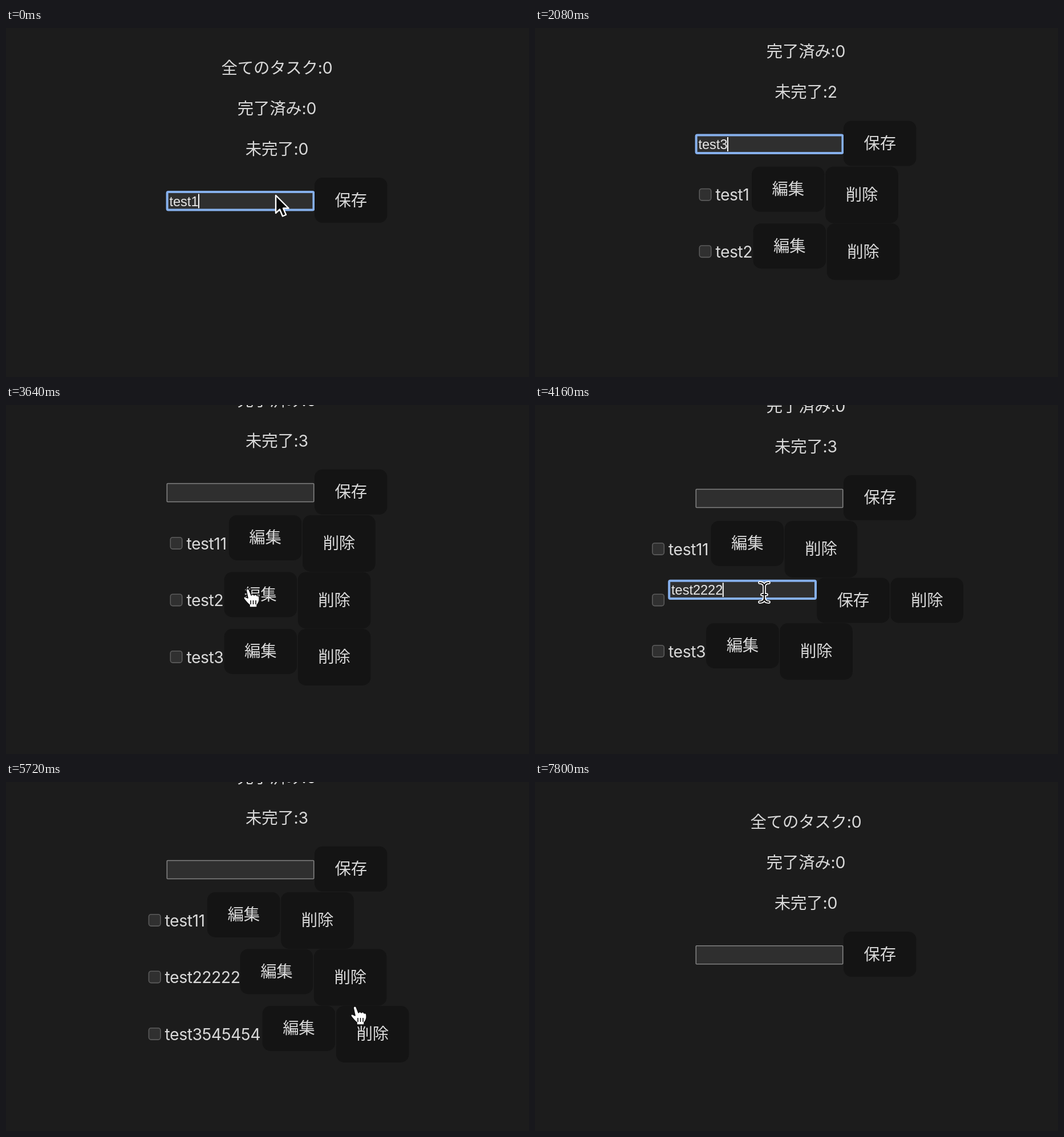
An HTML page for the animation above (8000 ms loop, 917x611 px).

```html
<!DOCTYPE html>
<html lang="ja">
<head>
<meta charset="utf-8">
<title>タスク</title>
<style>
html, body { margin: 0; width: 100%; height: 100%; overflow: hidden; background: #1c1c1c; }
svg { display: block; width: 917px; height: 611px; filter: blur(.5px); }
text {
  fill: #d9d9d9;
  font: 28.4px Inter, "Noto Sans CJK JP", "Noto Sans CJK", sans-serif;
  font-feature-settings: "calt" 0;
  white-space: pre;
}
.mid { text-anchor: middle; letter-spacing: -.2px; }
.task { letter-spacing: -.5px; }
.typed { font: 23.5px "Liberation Sans", Arial, sans-serif; fill: #e6e6e6; }
.button { fill: #141414; }
.field { fill: #2f2f2f; stroke: #828282; stroke-width: 1.6; }
.box { fill: #303030; stroke: #5c5c5c; stroke-width: 1.6; }
.ring { stroke: #86b0ec; stroke-width: 4; }
.button.ring { fill: #121212; }
</style>
</head>
<body>
<svg id="stage" viewBox="0 0 917 611"></svg>
<script>
const LOOP = 8000, STEP = 520;
const CENTER = 475, FORM_W = 387, FIELD_W = 259, BUTTON_W = 127.5, BUTTON_H = 79, GAP = 1.8;
const ROW_H = 99.5, EDIT_H = 79.5, TEXT_X = 35;

// Label widths that the buttons follow
const WIDTHS = { test1: 63.5, test2: 66, test3: 66, test11: 74.3, test22222: 132, test3545454: 171 };

const first = ['test1', 'test2', 'test3'];
const second = ['test11', 'test2', 'test3'];
const third = ['test11', 'test22222', 'test3'];

// value: new task field (missing = unfocused); edit: row being edited; focus: focused part of a row
const steps = [
  { tasks: [], value: 'test1', cursor: ['arrow', 472, 292] },
  { tasks: ['test1'], value: '' },
  { tasks: ['test1'], value: 'test2' },
  { tasks: ['test1', 'test2'], value: '' },
  { tasks: ['test1', 'test2'], value: 'test3' },
  { tasks: first, edit: 0, draft: 'test1', focus: [0, 'save'], cursor: ['arrow', 467, 242] },
  { tasks: first, edit: 0, draft: 'test11', focus: [0, 'field'], cursor: ['beam', 440, 227] },
  { tasks: second, cursor: ['hand', 424, 322] },
  { tasks: second, edit: 1, draft: 'test2222', focus: [1, 'field'], cursor: ['beam', 402, 328] },
  { tasks: third, cursor: ['hand', 440, 426] },
  { tasks: third, edit: 2, draft: 'test3', focus: [2, 'field'], cursor: ['beam', 427, 425.5] },
  { tasks: ['test11', 'test22222', 'test3545454'], cursor: ['hand', 612, 393] },
  { tasks: ['test11', 'test3545454'], focus: [1, 'delete'], cursor: ['hand', 612, 393] },
  { tasks: [], cursor: ['arrow', 572, 345] },
  { tasks: [], cursor: ['arrow', 597, 384] },
  { tasks: [] }
];

const text = (x, y, str, cls) => `<text x="${x}" y="${y}" class="${cls}">${str}</text>`;

const rect = (x, y, w, h, r, cls, inset) =>
  `<rect x="${x + inset}" y="${y + inset}" width="${w - 2 * inset}" height="${h - 2 * inset}" rx="${r}" class="${cls}"/>`;

function button(x, y, label, h = BUTTON_H, focused = false) {
  return rect(x, y, BUTTON_W, h, focused ? 12 : 14, 'button' + (focused ? ' ring' : ''), focused ? 2 : 0)
    + text(x + BUTTON_W / 2, y + h / 2 + 10, label, 'mid');
}

function field(x, y, value, focused) {
  const caret = x + 5.5 + typedWidth(value);
  return rect(x, y, FIELD_W, 33.5, focused ? 2 : 1, 'field' + (focused ? ' ring' : ''), focused ? 1.1 : .8)
    + text(x + 5, y + 25.5, value, 'typed')
    + (focused ? `<path d="M${caret} ${y + 4.5}v25" stroke="#fff" stroke-width="2"/>` : '');
}

const pen = document.createElement('canvas').getContext('2d');
function typedWidth(value) {
  pen.font = '23.5px "Liberation Sans", Arial, sans-serif';
  return pen.measureText(value).width;
}

const cursors = {
  arrow: `<path d="M1 1V32L8 25.5L13 37.5L19 35L14 23.5H23.5Z" fill="#080808" stroke="#fff" stroke-width="2.4" stroke-linejoin="round"/>`,
  beam: ['#fff" stroke-width="5.6', '#0c0c0c" stroke-width="2.2'].map(s =>
    `<path d="M-8 -17Q-1 -17 0 -11Q1 -17 8 -17M0 -11V11M-8 17Q-1 17 0 11Q1 17 8 17M-4 4H4" fill="none" stroke="${s}" stroke-linecap="round"/>`).join(''),
  hand: `<path d="M-3 2Q-1 -2 2 1L6 11Q9 8 11 11Q14 8 16 12Q20 11 20 15Q21 23 16 28V32H3V28Q-1 25 -7 17Q-8 13 -4 14L0 16Z" fill="#fff" stroke="#111" stroke-width="1.6" stroke-linejoin="round"/>
    <path d="M5 20V27M9.5 20V27M14 20V27" stroke="#111" stroke-width="1.6"/>`
};

function row(task, i, left, y, s) {
  const editing = s.edit === i;
  const h = editing ? EDIT_H : ROW_H;
  const focus = s.focus && s.focus[0] === i ? s.focus[1] : '';
  const x = left + TEXT_X;
  const box = rect(left + 6, y + h / 2 - 11.8, 22, 22, 4, 'box', .8);
  if (editing) {
    const next = x + FIELD_W + 1;
    return box + field(x, y + 4.2, s.draft, focus === 'field')
      + button(next, y, '保存', BUTTON_H, focus === 'save')
      + button(next + BUTTON_W + GAP, y, '削除');
  }
  const next = x + WIDTHS[task];
  return box + text(x, y + h / 2 + 10, task, 'task')
    + button(next, y, '編集')
    + button(next + BUTTON_W + GAP, y, '削除', 99, focus === 'delete');
}

const rowWidth = (task, editing) =>
  TEXT_X + (editing ? FIELD_W + 1 : WIDTHS[task]) + 2 * BUTTON_W + GAP;

function scene(s) {
  const n = s.tasks.length;
  const heights = s.tasks.map((_, i) => s.edit === i ? EDIT_H : ROW_H);
  const shift = -heights.reduce((a, b) => a + b, 0) / 2;
  const width = Math.max(FORM_W, ...s.tasks.map((t, i) => rowWidth(t, s.edit === i)));
  const left = CENTER - width / 2;

  let out = [`全てのタスク:${n}`, '完了済み:0', `未完了:${n}`]
    .map((line, i) => text(CENTER, 79.9 + 71 * i + shift, line, 'mid')).join('');
  out += field(281.5, 286 + shift, s.value || '', s.value != null);
  out += button(541, 262 + shift, '保存');

  let y = 342.2 + shift;
  s.tasks.forEach((task, i) => {
    out += row(task, i, left, y, s);
    y += heights[i];
  });
  if (s.cursor) {
    const [kind, cx, cy] = s.cursor;
    out += `<g transform="translate(${cx} ${cy})">${cursors[kind]}</g>`;
  }
  return out;
}

const stage = document.getElementById('stage');
const start = performance.now();
let shown = -1;

function draw() {
  const t = (performance.now() - start) % LOOP;
  const i = Math.min(steps.length - 1, Math.floor(t / STEP));
  if (i !== shown) {
    shown = i;
    stage.innerHTML = scene(steps[i]);
  }
  requestAnimationFrame(draw);
}
draw();
</script>
</body>
</html>
```
